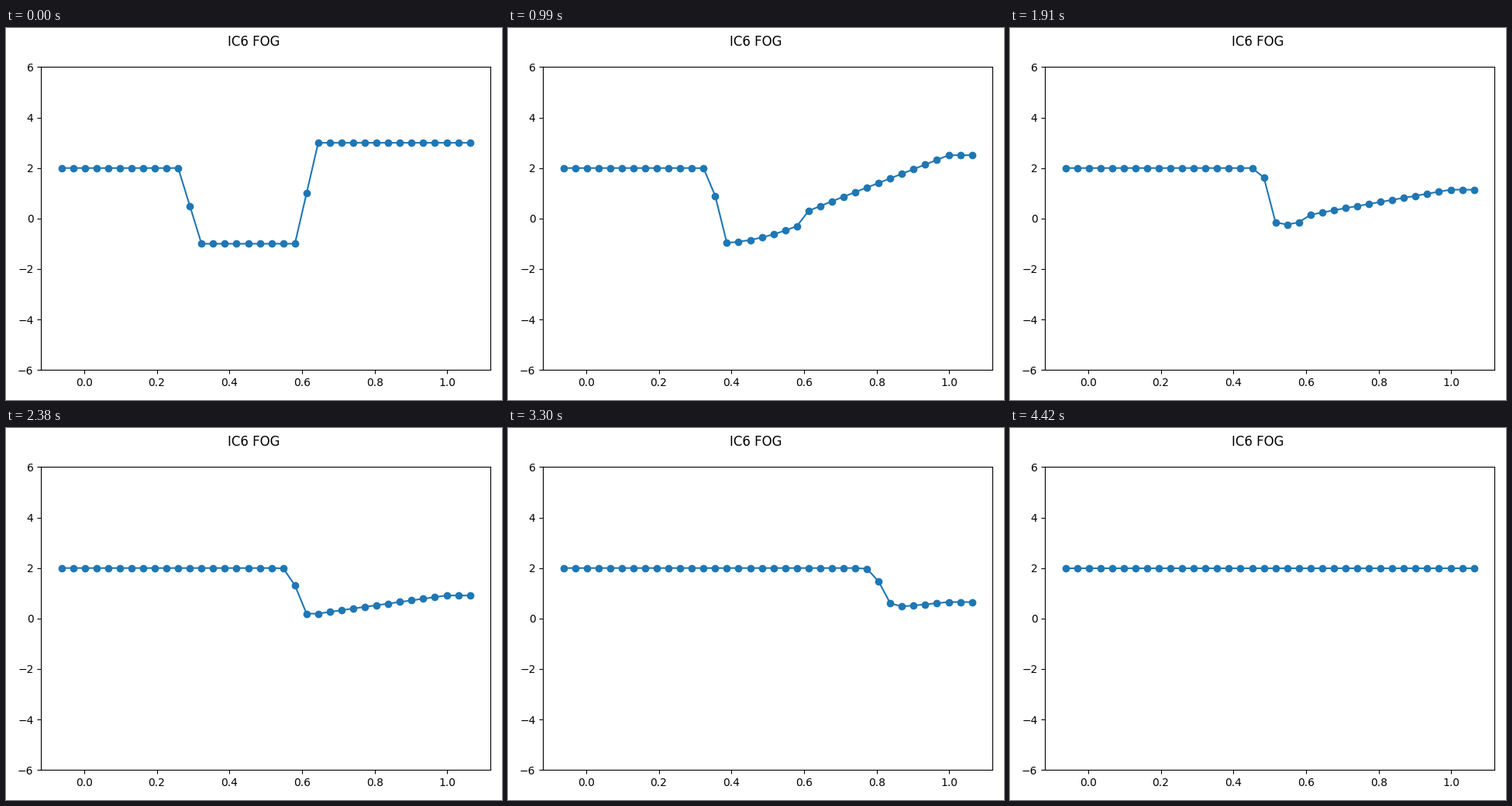
A matplotlib script that plays this animation: 640x480 px, repeating every 7.33 s.

```python
import matplotlib.pyplot as plt
import numpy as np
from matplotlib.animation import FuncAnimation

# First-order Godunov scheme for the inviscid Burgers equation
N = 32          # interior points
GHOST = 2       # ghost points on each side
CFL = 0.9

STEP = 66       # ms between solver steps
TICK = 16       # ms between drawn frames
LEAD = 10       # ms, rounds a step to a close tick
FRAMES = 458

x = np.linspace(-GHOST / N, 1 + GHOST / N, N + 2 * GHOST)


def initial():
    """Three constant states with the mean value at each jump."""
    u = np.full(x.size, 3.0)
    u[:11] = 2.0
    u[11] = 0.5
    u[12:21] = -1.0
    u[21] = 1.0
    return u


def flux(left, right):
    """Exact Riemann flux for f(u) = u^2 / 2."""
    return np.maximum(np.maximum(left, 0) ** 2, np.minimum(right, 0) ** 2) / 2


def advance(u):
    ratio = CFL / np.abs(u).max()
    f = flux(u[:-1], u[1:])
    new = u.copy()
    new[GHOST:-GHOST] -= ratio * np.diff(f)[GHOST - 1:1 - GHOST]
    new[:GHOST] = new[GHOST]
    new[-GHOST:] = new[-GHOST - 1]
    return new


def step_at(i):
    return (i * TICK + LEAD) // STEP


states = [initial()]
while len(states) <= step_at(FRAMES - 1):
    states.append(advance(states[-1]))

fig, ax = plt.subplots(figsize=(6.4, 4.8), dpi=100)
fig.suptitle("IC6 FOG", y=0.982)
line, = ax.plot(x, states[0], "-o")
ax.set_ylim(-6, 6)
fig.tight_layout()
fig.subplots_adjust(top=0.895)


def update(i):
    line.set_ydata(states[step_at(i)])
    return line,


anim = FuncAnimation(fig, update, frames=FRAMES, interval=TICK,
                     repeat=True, repeat_delay=0)
plt.show()
```
